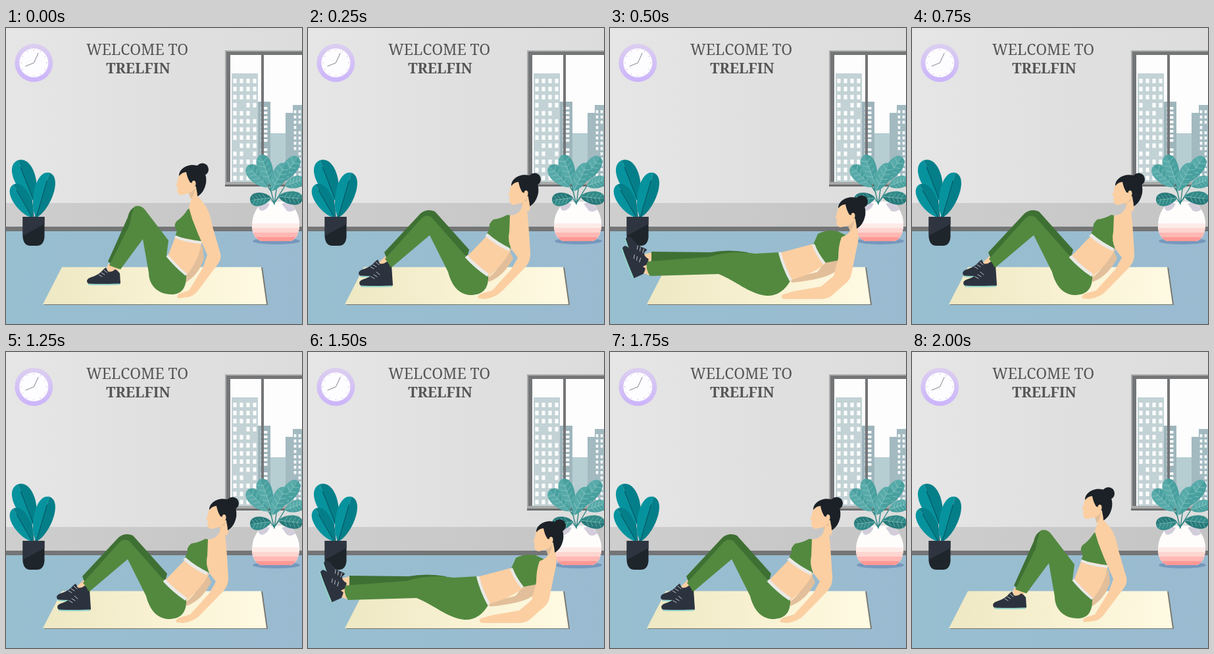
Recreate the animation shown at these times as an HTML page. Size 450 by 450 pixels, loop 2500 ms.

```html
<!DOCTYPE html>
<html lang="en">
<head>
<meta charset="utf-8">
<title>Home workout</title>
<style>
  html, body { margin: 0; width: 100%; height: 100%; overflow: hidden; }
  svg { display: block; width: 100vw; height: 100vh; }
  text { font-family: "Noto Serif", "Liberation Serif", serif; fill: #555557; text-anchor: middle; }
</style>
</head>
<body>
<svg id="stage" viewBox="0 0 450 450"></svg>
<script>
const SKIN = '#fbcfa2', SKIN_DARK = '#e2bf9a', GREEN = '#52893f', GREEN_DARK = '#3f7033';
const HAIR = '#1b2127', SHOE = '#2c333f', SOLE = '#93d3ca', BAND = '#e9e9e6';

const path = (d, fill) => `<path d="${d}" fill="${fill}"/>`;
const line = (d, stroke, width, cap = 'round') =>
  `<path d="${d}" fill="none" stroke="${stroke}" stroke-width="${width}" stroke-linecap="${cap}" stroke-linejoin="round"/>`;
const rect = (x, y, w, h, fill) => `<rect x="${x}" y="${y}" width="${w}" height="${h}" fill="${fill}"/>`;
const circle = (x, y, r, fill) => `<circle cx="${x}" cy="${y}" r="${r}" fill="${fill}"/>`;
const ellipse = (x, y, rx, ry, fill) => `<ellipse cx="${x}" cy="${y}" rx="${rx}" ry="${ry}" fill="${fill}"/>`;
const group = (transform, body) => `<g transform="${transform}">${body}</g>`;

function gradient(id, vertical, ...colors) {
  const stops = colors.map((c, i) => `<stop offset="${i / (colors.length - 1)}" stop-color="${c}"/>`);
  return `<linearGradient id="${id}" x1="0" y1="0" x2="${vertical ? 0 : 1}" y2="${vertical ? 1 : 0}">${stops.join('')}</linearGradient>`;
}

// A blunt leaf from its base to its tip; w is half its width.
function leaf(x1, y1, x2, y2, w, fill, shade, vein, ribs) {
  const len = Math.hypot(x2 - x1, y2 - y1);
  const turn = Math.atan2(y2 - y1, x2 - x1) * 180 / Math.PI + 90;
  const side = s => `C${s * w * 1.1},${-len * .18} ${s * w * 1.6},${-len * .98} 0,${-len}Z`;
  let veins = `M0,0V${-len * .82}`;
  for (let k = .25; ribs && k < .8; k += .17) {
    const y = -len * k, reach = w * .7;
    veins += `M${-reach},${y - reach * .6}L0,${y}L${reach},${y - reach * .6}`;
  }
  return group(`translate(${x1} ${y1}) rotate(${turn})`,
    path('M0,0' + side(-1), fill) + path('M0,0' + side(1), shade) + line(veins, vein, ribs ? .7 : 1.2));
}

function tower(x, y, w, h, cols, step, fill) {
  let out = rect(x, y, w, h, fill);
  const gap = w / cols;
  for (let row = 0; row * step + 14 < h; row++)
    for (let c = 0; c < cols; c++)
      if ((row * 5 + c * 3) % 11 !== 7)
        out += rect(x + gap * (c + .24), y + 8 + row * step, gap * .52, step * .56, '#fbfcfc');
  return out;
}

function cityWindow() {
  return rect(333, 34, 117, 207, '#a7aaa8') + rect(335, 36, 115, 204, '#737577') +
    rect(341, 41, 109, 193, '#fdfdfd') +
    rect(402, 160, 24, 74, '#b6cdd2') + rect(425, 129, 12, 105, '#a3bac1') +
    tower(343, 69, 40, 165, 4, 12.3, '#c2d2d5') +
    tower(383, 112, 19, 122, 1, 7, '#9fb5bc') +
    tower(436, 117, 14, 117, 2, 8, '#a3bac1') +
    rect(388, 41, 4, 193, '#737577') +
    rect(333, 234, 117, 5, '#a7aaa8') + rect(333, 238, 117, 3, '#6c6e70');
}

function clock() {
  let ticks = '';
  for (let i = 0; i < 12; i++) {
    const a = i * Math.PI / 6, c = Math.cos(a), s = Math.sin(a);
    ticks += `M${42.3 + 19 * c},${53 + 19 * s}L${42.3 + 20.3 * c},${53 + 20.3 * s}`;
  }
  return circle(42.3, 53, 29, 'url(#ring)') + circle(42.3, 53, 22, '#fdfcff') +
    line(ticks, '#cfc6dc', 1) + line('M49,38.5L42.3,53L30,58', '#85818e', 1);
}

function darkPlant() {
  const fill = '#06939e', shade = '#047f89', vein = '#045a66';
  return line('M38,252L42,290M44,290L50,268M40,290L33,272', vein, 1.5) +
    leaf(42, 262, 18, 201, 16, fill, shade, vein) +
    leaf(46, 288, 66, 220, 14.5, fill, shade, vein) +
    leaf(40, 288, 11, 238, 13, fill, shade, vein) +
    path('M25.5,287H58.5V318Q57,331 47,331H37Q27,331 25.5,318Z', '#1e252b') +
    path('M25.5,287H58.5V298L25.5,316Z', '#2e3540');
}

function pinkPlant() {
  const upper = ['#57aaa9', '#48a09f', '#8cc9c5', true], lower = ['#318a88', '#27797a', '#7dbcb8', true];
  const high = [
    [398, 242, 367, 210, 11], [403, 238, 387, 193, 11], [414, 236, 444, 196, 11],
    [404, 248, 425, 206, 11], [424, 240, 453, 230, 9]
  ];
  const low = [[414, 256, 451, 260, 10], [403, 258, 371, 262, 10]];
  const bowl = 'M391,264H430C441,274 447,287 446,301C445,314 440,322 432,324H388C379,321 374,312 374,300C374,286 380,273 391,264Z';
  const bands = ['#fdebe8', '#fdd5d1', '#ffb8b4', '#ff9895'];
  return ellipse(411, 324, 36, 5, '#7698bd') +
    `<clipPath id="bowl"><path d="${bowl}"/></clipPath>` + path(bowl, '#fffdfc') +
    '<g clip-path="url(#bowl)">' + bands.map((c, i) => rect(370, 297 + i * 7, 80, 30, c)).join('') + '</g>' +
    path('M384,271L392,265L401,267Q396,278 388,278Q383,276 384,271ZM419,267L430,264L440,276Q434,281 427,278Z', '#d3cddb') +
    line('M408,268L400,236M408,268L412,238M408,266L424,240M408,266L415,256M407,266L402,258M404,250L396,238', '#2d8583', 1.4) +
    high.map(l => leaf(...l, ...upper)).join('') + low.map(l => leaf(...l, ...lower)).join('');
}

function room() {
  return '<defs>' + gradient('wall', false, '#e6e6e6', '#e0e0e0', '#dcdcdc') +
    gradient('panel', false, '#cecece', '#c4c4c4') + gradient('floor', false, '#97bfd0', '#9abad0') +
    gradient('mat', false, '#eee8c3', '#f8f1d2', '#fffae3') + gradient('ring', true, '#dccff0', '#cbb4fa') + '</defs>' +
    rect(0, 0, 450, 267, 'url(#wall)') + rect(0, 266, 450, 37, 'url(#panel)') +
    rect(0, 302, 450, 8, '#747577') + rect(0, 309, 450, 141, 'url(#floor)') +
    clock() +
    '<text x="199.5" y="41" font-size="22.8">WELCOME TO</text>' +
    '<text x="201" y="68.5" font-size="21.8" font-weight="700">TRELFIN</text>' +
    cityWindow() + darkPlant() + pinkPlant() +
    path('M387,364H390L398,421H58V419Z', '#77756c') + path('M85,363.5H388L396,420H56Z', 'url(#mat)');
}

function head(dx, dy) {
  return group(`translate(${dx} ${dy})`,
    path('M266,219C260,225 263,232 258,239L261,241L260,246Q261,254 267,254L278,251L281,260L290,264L294,250L292,222L278,214Z', SKIN) +
    path('M278,251Q284,249 287,243Q287,253 281,260Z', SKIN_DARK) +
    circle(298.5, 215, 9.5, HAIR) +
    path('M263,225C263,214 276,206 290,209C301,212 306,225 304,236C302,246 297,253 291,256C291,249 289,245 289,241C286,241 283,234 280,235C277,230 275,225 274,219Q268,219 263,225Z', HAIR) +
    ellipse(285.5, 236.5, 3, 4.6, SKIN));
}

function shoe(x, y, turn = 0) {
  return group(`translate(${x} ${y}) rotate(${turn})`,
    path('M0,20Q1,16 9,14Q20,10 25,3L29,0L32,6Q37,8 43,3Q46,4 50,9L51,23Q51,26 47,26H8Q0,26 0,20Z', SHOE) +
    line('M3,25.5Q14,26.5 49,25.5', SOLE, 2.2) +
    line('M22,8L27,11M18,11L23,14M26,4L31,8', '#cfd6da', .9));
}

const sitting =
  path('M299,331L301,350Q294,374 273,387L271,381Q285,362 290,340Z', SKIN_DARK) +
  path('M198,271Q188,274 185,288L155,355L166,363L204,318Z', GREEN_DARK) +
  path('M155,358L171,365L170,372L153,370Z', SKIN) +
  shoe(123, 364) +
  path('M258,316L246,347L274,376Q292,356 298,325Z', SKIN) +
  path('M196,271Q205,269 211,276L247,323L244,346L274,374C275,395 267,405 252,405C230,405 217,390 217,372L208,321L174,367L157,361L188,299Q191,280 196,271Z', GREEN) +
  line('M245,346Q258,362 274,375', BAND, 4, 'butt') +
  head(0, 0) +
  path('M279,274L286,276L300,325L257,317L260,308Q254,300 259,294Q270,286 276,276Z', GREEN) +
  line('M257,317Q275,325 297,326', BAND, 4, 'butt') +
  path('M281,262L278,273L283,290L292,313L306,345L299,365L278,399L263,404Q258,408 262,411L277,409Q286,407 292,399L322,359Q328,351 326,343L314,302Q309,276 301,267L293,257Z', SKIN);

const leaning =
  path('M304,334L312,350Q298,377 275,386L271,381Q289,371 298,345Z', SKIN_DARK) +
  path('M106,358L120,345L130,361L122,374Z', SKIN) +
  shoe(77, 352) + shoe(78, 367) +
  path('M171,282Q181,274 193,279L245,337L242,348L190,310L125,364L116,341Z', GREEN_DARK) +
  path('M271,317L242,347L274,378Q295,362 309,337Z', SKIN) +
  path('M171,291Q179,282 188,288L240,347L274,376C275,398 264,406 247,406C228,405 218,390 213,371L185,315L127,364L117,351Z', GREEN) +
  line('M240.5,347Q255,363 274,376', BAND, 5, 'butt') +
  head(46, 15) +
  path('M303,284L313,286L308,336L271,314L276,305Q274,297 282,291Q292,290 303,284Z', GREEN) +
  line('M271,314Q287,328 306,337', BAND, 5, 'butt') +
  path('M327,264L333,264Q333,282 335,296L338,341Q339,354 331,363L296,399Q287,409 270,412L259,411Q257,407 263,404L280,399L309,367L319,349L309,336Q303,322 306,310L307,285Q325,284 327,264Z', SKIN);

const lying =
  path('M327,357L346,352L344,369Q330,382 276,387L274,381L315,371Z', SKIN_DARK) +
  path('M44,346L64,341L60,376L44,370Z', SKIN) +
  shoe(46, 310, 69) +
  path('M63,340L153,341Q180,336 210,341L190,362L63,358Z', GREEN_DARK) +
  shoe(41, 324, 69) +
  path('M310,328L257,342L275,383Q309,374 328,358Z', SKIN) +
  path('M57,355L150,348Q185,337 221,343L258,341L275,383Q261,408 238,407C211,404 191,384 165,374L61,377Q53,366 57,355Z', GREEN) +
  line('M258,341Q264,364 275,384', BAND, 4.4, 'butt') +
  head(84, 49) +
  path('M316,313Q330,306 346,309L361,316L349,353L327,357L309,329Q313,320 316,313Z', GREEN) +
  line('M309,329Q315,345 326,358', BAND, 4.4, 'butt') +
  path('M352,318Q362,314 365,309L376,305Q380,317 375,335L367,374Q365,384 355,391L338,406Q332,412 318,412L264,412Q258,409 263,405L280,400L321,393L340,377L347,350Q347,331 352,318Z', SKIN);

const stage = document.getElementById('stage');
const poses = [sitting, leaning, lying];
stage.innerHTML = room() + poses.map(p => `<g class="pose">${p}</g>`).join('');
const figures = stage.querySelectorAll('.pose');

// Two sit-ups, then a rest in the seated pose.
const BEAT = 250, beats = [0, 1, 2, 1, 0, 1, 2, 1, 0, 0];

function draw(time) {
  const pose = beats[Math.floor(time / BEAT) % beats.length];
  figures.forEach((figure, i) => { figure.style.display = i === pose ? '' : 'none'; });
}

const start = performance.now();
function tick() {
  draw(performance.now() - start);
  requestAnimationFrame(tick);
}
tick();
</script>
</body>
</html>
```
